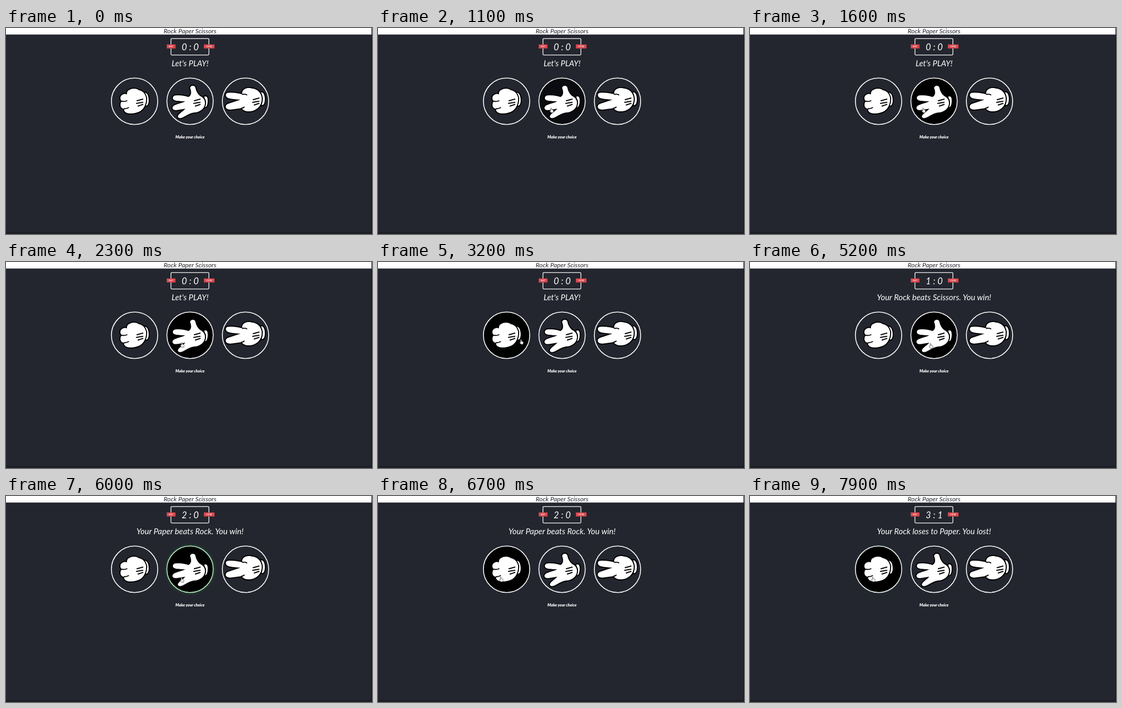
An HTML page for the animation above (8000 ms loop, 690 px wide and 388 px high).

```html
<!DOCTYPE html>
<html lang="en">
<head>
<meta charset="utf-8">
<title>Rock Paper Scissors</title>
<style>
  html, body { margin: 0; width: 100%; height: 100%; overflow: hidden; background: #24262f; }
  svg { display: block; width: 100%; height: 100%; }
  text { font-family: Lato, "Open Sans", sans-serif; font-style: italic; text-anchor: middle; fill: #fff; }
  .glove path { fill: #fff; stroke: #000; stroke-width: 4; stroke-linejoin: round; paint-order: stroke; }
  path.crease { fill: none; stroke: #000; stroke-width: 1.9; stroke-linecap: round; }
  .choice circle { stroke-width: 1.6; }
  .badge { font-size: 4.8px; }
</style>
</head>
<body>
<svg viewBox="0 0 690 388">
  <defs>
    <path id="seams" class="crease" d="M-6 -3L5 -6M-7 2L5 0M-4 7L5 4"/>
  </defs>
  <rect width="690" height="388" fill="#24262f"/>
  <rect y="384" width="690" height="4" fill="#1d1f27"/>
  <rect width="690" height="12.3" fill="#fff"/>
  <rect x="689" width="1" height="388" fill="#111318"/>
  <text x="347" y="9.8" font-size="12.3" style="fill:#24262f">Rock Paper Scissors</text>

  <rect x="311" y="19.8" width="71.5" height="31" rx="1.5" fill="none" stroke="#fff" stroke-width="1.3"/>
  <rect x="303" y="31" width="16.5" height="7.5" fill="#d9484f"/>
  <rect x="373" y="31" width="20" height="7.5" fill="#d9484f"/>
  <text class="badge" x="311" y="36.2">user</text>
  <text class="badge" x="383" y="36.2">comp</text>
  <text id="score" x="347.3" y="41.6" font-size="17"></text>
  <text id="message" x="347" y="72" font-size="15.4"></text>

  <g class="choice" id="rock">
    <circle cx="242.4" cy="138" r="43.7"/>
    <g class="glove">
      <path d="M261 122C266 121 269 128 269 136C269 143 267 147 263 146Q265 134 261 122Z"/>
      <path d="M232 117C238 113 247 114 250 117C257 118 262 123 264 131C265 141 261 151 254 156C246 161 234 162 228 160C223 158 222 155 223 152C218 152 215 148 216 143C216 140 218 139 219 138C214 135 215 128 219 126C222 124 225 124 228 125C228 121 229 118 232 117Z"/>
      <path class="crease" d="M219 138Q224 139 228 137M223 152Q228 152 231 150"/>
      <use href="#seams" x="253" y="140"/>
    </g>
  </g>
  <g class="choice" id="paper">
    <circle cx="347" cy="138" r="43.7"/>
    <g class="glove">
      <path d="M374 129C380 127 381 134 380 141C379 148 377 150 373 149Q376 138 374 129Z"/>
      <path d="M347 113C348 108 355 107 357 112C358 118 361 124 366 128C372 131 376 136 375 143C374 152 366 158 357 159C350 159 343 163 336 167C331 170 325 171 324 167C324 162 333 158 338 152C330 153 321 156 316 154C312 151 314 147 319 145C326 142 333 141 338 138C330 138 320 138 316 135C313 132 315 127 320 127C329 126 338 128 344 130C350 127 350 120 347 113Z"/>
      <use href="#seams" x="361" y="140"/>
    </g>
  </g>
  <g class="choice" id="scissors">
    <circle cx="451.5" cy="138" r="43.7"/>
    <g class="glove">
      <path d="M481 121C486 121 488 127 488 134C488 141 486 146 482 145Q485 133 481 121Z"/>
      <path d="M446 119C449 113 458 112 464 114C474 115 480 121 482 131C483 143 477 151 468 155C458 159 448 157 444 151C434 152 424 155 418 153C413 151 413 145 418 143C426 140 434 138 442 135C432 134 422 134 417 131C413 128 414 122 419 122C428 121 438 123 446 125C445 123 445 121 446 119Z"/>
      <path class="crease" d="M446 125Q451 124 454 126M444 151Q447 151 449 149"/>
      <use href="#seams" x="472" y="138"/>
    </g>
  </g>
  <text x="347" y="207.7" font-size="7.4" font-weight="900">Make your choice</text>

  <path id="cursor" d="M-1.5 -4Q-.6 -5.2 .2 -4L.6 -1.2L3 -.6Q4.2 0 3.8 1.6L3 4.6H-.6L-3.2 1.2Q-3 -.1 -1.3 .8Z" fill="#fff" stroke="#333" stroke-width=".7" stroke-linejoin="round"/>
</svg>
<script>
const LOOP = 8000, STEP = 100, FADE = 300;
const byId = id => document.getElementById(id);

const rounds = [
  { at: 0, score: "0 : 0", message: "Let's PLAY!" },
  { at: 3700, score: "1 : 0", message: "Your Rock beats Scissors. You win!", glow: "rock" },
  { at: 5600, score: "2 : 0", message: "Your Paper beats Rock. You win!", glow: "paper" },
  { at: 7400, score: "3 : 0", message: "Your Rock beats Scissors. You win!", glow: "rock" },
  { at: 7900, score: "3 : 1", message: "Your Rock loses to Paper. You lost!" }
];
const hovers = {
  rock: [[2950, 4500], [6300, 9000]],
  paper: [[985, 2750], [4700, 6150]],
  scissors: []
};
// time, x, y
const route = [
  [800, 152, 187], [900, 250, 192], [1100, 327, 155], [1800, 327, 155],
  [2300, 332, 156], [2600, 332, 156], [3000, 272, 150], [3600, 265, 152],
  [4300, 265, 152], [4800, 325, 158], [5200, 341, 158], [5900, 341, 158],
  [6450, 232, 157], [8000, 232, 157]
];

const clamp = v => Math.min(1, Math.max(0, v));
const ease = p => 1 - Math.pow(1 - clamp(p), 2.4);
const mix = (a, b, p) => a.map((v, i) => v + (b[i] - v) * p);
const rgb = c => `rgb(${c.map(Math.round)})`;

// Rises after `from` and falls again after `to`, like a CSS transition.
const pulse = (t, from, to) => ease((t - from) / FADE) * (1 - ease((t - to) / FADE));

function drawChoice(id, t) {
  const circle = byId(id).querySelector("circle");
  const dark = Math.max(0, ...hovers[id].map(([from, to]) => pulse(t, from, to)));
  const glow = Math.max(0, ...rounds.filter(r => r.glow === id).map(r => pulse(t, r.at, r.at + FADE)));
  circle.style.fill = rgb(mix([36, 38, 47], [0, 0, 0], dark));
  circle.style.stroke = rgb(mix([255, 255, 255], [77, 214, 105], glow));
  circle.style.filter = glow ? `drop-shadow(0 0 2.5px rgba(49, 200, 70, ${glow}))` : "none";
}

function drawCursor(t) {
  const cursor = byId("cursor");
  const next = route.findIndex(p => p[0] > t);
  cursor.style.visibility = next ? "visible" : "hidden";
  if (!next) return;
  const a = route[next - 1], b = route[next];
  const p = (t - a[0]) / (b[0] - a[0]);
  const [, x, y] = mix(a, b, p * p * (3 - 2 * p));
  cursor.setAttribute("transform", `translate(${x} ${y})`);
}

function draw(t) {
  const round = rounds.filter(r => r.at <= t).pop();
  byId("score").textContent = round.score;
  byId("message").textContent = round.message;
  Object.keys(hovers).forEach(id => drawChoice(id, t));
  drawCursor(t);
}

let start;
function tick(now) {
  start ??= now;
  draw(Math.floor((now - start) % LOOP / STEP) * STEP);
  requestAnimationFrame(tick);
}
draw(0);
requestAnimationFrame(tick);
</script>
</body>
</html>
```
